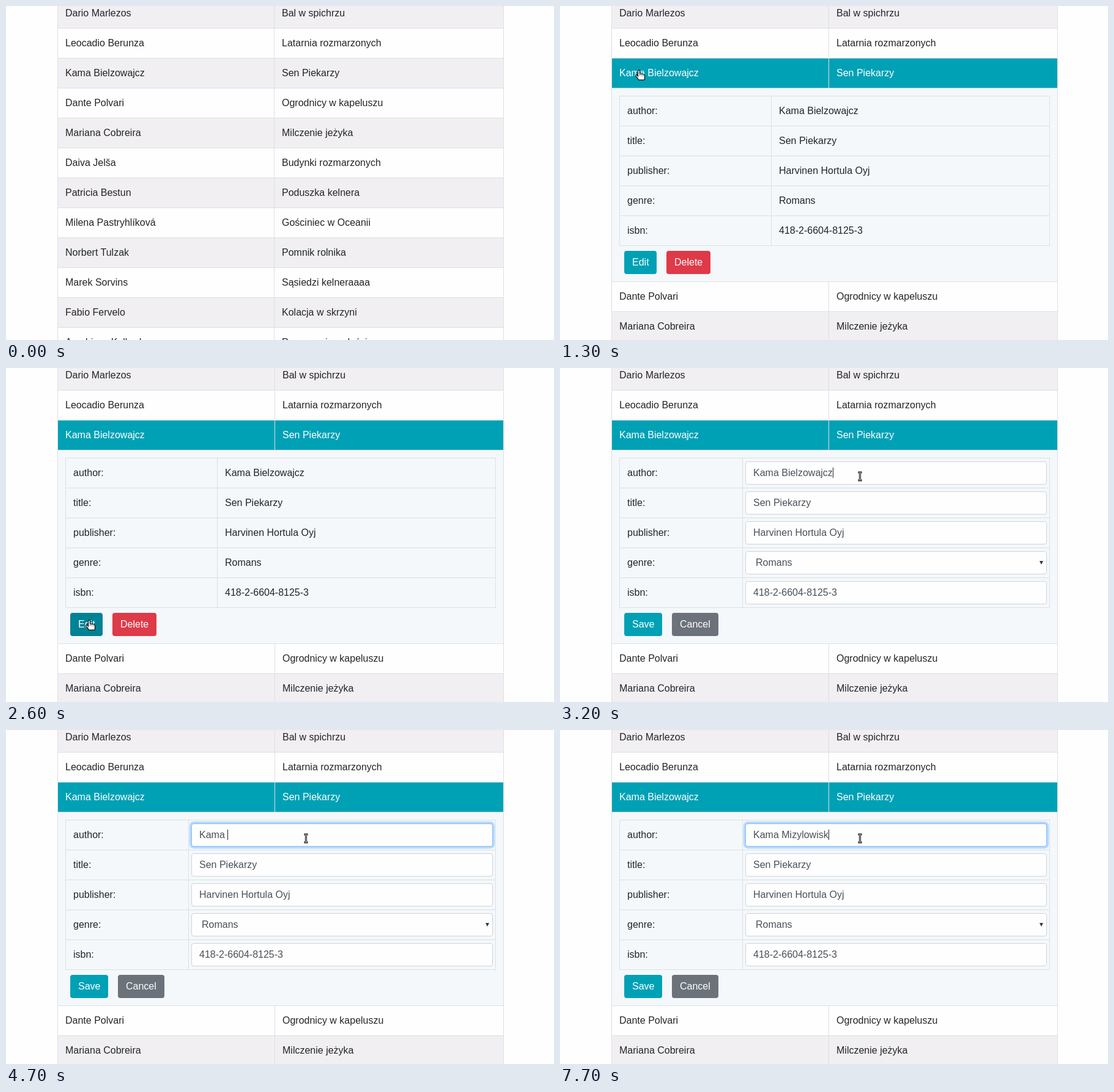
Animation, 896 px wide and 547 px high, one loop 8 s. Source, as an HTML page:

```html
<!DOCTYPE html>
<html lang="pl">
<head>
<meta charset="utf-8">
<title>Book table</title>
<style>
  html, body { margin: 0; width: 100%; height: 100%; overflow: hidden; background: #fefefe; }
  #stage { position: absolute; left: 0; top: 0; width: 896px; height: 547px; overflow: hidden;
    font: 16px/24px "Liberation Sans", Arial, sans-serif; color: #212529; }
  #stage div { position: absolute; box-sizing: border-box; white-space: pre; }
  .scene { inset: 0; }
  .row, .detail { border: 1px solid #dcdfe4; }
  .row > div { top: 0; height: 48px; padding: 12px; }
  .row > div + div { border-left: 1px solid #dcdfe4; }
  .plain { background: #fefefe; }
  .striped { background: #f1eff2; }
  .hover { background: #ebe9ea; }
  .selected { background: #00a1b5; color: #fff; }
  .detail { background: #f4f8fa; }
  .button { padding: 7px 13px; border-radius: 4px; color: #fff; }
  .info { background: #00a1b5; }
  .info.hover { background: #008295; }
  .danger { background: #de3a48; }
  .secondary { background: #6b727a; }
  .input { padding: 6px 12px; border: 1px solid #ced4da; border-radius: 4px; background: #fefefe; color: #495057; }
  .select { padding-left: 16px; }
  .select::after { content: ""; position: absolute; right: 5px; top: 15px;
    border: solid transparent; border-width: 6px 3px 0; border-top-color: #343a40; }
  #caret { display: inline-block; width: 1px; height: 17px; margin-right: -1px; vertical-align: -3px; background: #212529; }
  svg { position: absolute; left: 0; top: 0; width: 896px; height: 547px; }
</style>
</head>
<body>
<div id="stage"></div>
<script>
const LOOP = 8000, ROW = 49, OPEN_ROW = 2, DETAIL_HEIGHT = 317;

const books = [
  ["Dario Marlezos", "Bal w spichrzu"],
  ["Leocadio Berunza", "Latarnia rozmarzonych"],
  ["Kama Bielzowajcz", "Sen Piekarzy"],
  ["Dante Polvari", "Ogrodnicy w kapeluszu"],
  ["Mariana Cobreira", "Milczenie jeżyka"],
  ["Daiva Jelša", "Budynki rozmarzonych"],
  ["Patricia Bestun", "Poduszka kelnera"],
  ["Milena Pastryhlíková", "Gościniec w Oceanii"],
  ["Norbert Tulzak", "Pomnik rolnika"],
  ["Marek Sorvins", "Sąsiedzi kelneraaaa"],
  ["Fabio Fervelo", "Kolacja w skrzyni"],
  ["Arsebiusz Kolbud", "Powracanie radości"],
];
const [author, title] = books[OPEN_ROW];
const fields = [
  ["author:", author],
  ["title:", title],
  ["publisher:", "Harvinen Hortula Oyj"],
  ["genre:", "Romans"],
  ["isbn:", "418-2-6604-8125-3"],
];

// Scene markup
const box = (x, y, w, h, cls, content = "", id = "") =>
  `<div id="${id}" class="${cls}" style="left:${x}px;top:${y}px;width:${w}px;height:${h}px">${content}</div>`;

const row = (x, y, w, split, cls, left, right, id) =>
  box(x, y, w, ROW + 1, "row " + cls,
    `<div>${left}</div><div style="left:${split - x - 1}px">${right}</div>`, id);

const button = (x, w, cls, label, id) => box(x, 401, w, 38, "button " + cls, label, id);

function bookRows(open) {
  return books.map(([name, book], i) => {
    const y = -13 + ROW * i + (open && i > OPEN_ROW ? DETAIL_HEIGHT : 0);
    const chosen = i === OPEN_ROW;
    const cls = open && chosen ? "selected" : i % 2 ? "plain" : "striped";
    return row(84, y, 730, open ? 439 : 438, cls, name, book, !open && chosen ? "target" : "");
  }).join("");
}

function detail(split, editing) {
  const rows = fields.map(([label, value], i) => {
    const y = 147 + ROW * i;
    if (!editing) return row(97, y, 704, split, "", label, value);
    const cls = "input" + (label === "genre:" ? " select" : "");
    return row(97, y, 704, split, "", label, "") +
      box(303, y + 6, 493, 38, cls, i ? value : '<span id="typed"></span><i id="caret"></i>', i ? "" : "field");
  }).join("");
  const buttons = editing
    ? button(105, 62, "info", "Save", "save") + button(183, 76, "secondary", "Cancel")
    : button(105, 53, "info", "Edit", "edit") + button(174, 72, "danger", "Delete");
  return box(84, 134, 730, DETAIL_HEIGHT + 1, "detail") + rows + buttons;
}

const scenes = [
  bookRows(false),
  bookRows(true) + detail(345, false),
  bookRows(true) + detail(298, true),
];

const beamPath = "M3 3Q4.5 3 4.5 4.5V14.5Q4.5 16 3 16M6 3Q4.5 3 4.5 4.5M4.5 14.5Q4.5 16 6 16";
const beamStroke = (color, width) =>
  `<path d="${beamPath}" fill="none" stroke="${color}" stroke-width="${width}" stroke-linecap="square"/>`;

const cursors = {
  arrow: `<path d="M.7 .8V15.5L4.1 12.4 6.6 18 9 17 6.6 11.5H11.3Z" fill="#fff" stroke="#000"/>`,
  hand: `<path d="M4.5 11V2.3Q4.5.8 6 .8T7.5 2.3V7L13.5 8Q15.5 8.4 15.5 10.5V15.5Q15.5 17.2 13.8 17.2H7Q5.6 17.2 5 16L1 10.6Q.4 9.2 1.6 8.7 2.8 8.4 4.5 11Z" fill="#fff" stroke="#000" stroke-width="1.2"/>
    <path d="M7.5 8v2.5M10.2 9v2M12.8 9.5v2" stroke="#000" stroke-width=".8" stroke-opacity=".7"/>`,
  beam: beamStroke("#000", 3) + beamStroke("#fff", 1),
};

const $ = id => document.getElementById(id);
$("stage").innerHTML = scenes.map((s, i) => `<div class="scene" id="scene${i}">${s}</div>`).join("") +
  `<svg>${Object.keys(cursors).map(k => `<g id="${k}">${cursors[k]}</g>`).join("")}</svg>`;

// Timelines: [start time, ...state]
const sceneTimes = [[0, 0], [1300, 1], [2700, 2]];

const pointer = [
  [0, "none", 0, 0],
  [700, "arrow", 25, 128], [800, "arrow", 58, 123], [900, "hand", 91, 115],
  [1000, "hand", 115, 107], [1100, "hand", 123, 104], [1600, "hand", 147, 119],
  [1800, "arrow", 270, 150], [1900, "arrow", 400, 195], [2000, "arrow", 436, 260],
  [2100, "arrow", 390, 325], [2200, "arrow", 290, 376], [2400, "arrow", 185, 405],
  [2500, "hand", 140, 413], [2600, "hand", 130, 412],
  [2800, "arrow", 250, 340], [2900, "beam", 455, 200], [3100, "beam", 486, 168],
];

const firstName = author.split(" ")[0] + " ";
const erased = [[0, 11], [3600, 10], [4100, 9], [4200, 7], [4300, 5], [4400, 3], [4600, 1], [4700, 0]]
  .map(([t, n]) => [t, author.slice(0, firstName.length + n)]);
const typed = [
  [5300, "M"], [5500, "Mi"], [5600, "Miz"], [6100, "Mizy"], [6300, "Mizyl"], [6600, "Mizylw"],
  [7100, "Mizyl"], [7200, "Mizylo"], [7400, "Mizylowi"], [7700, "Mizylowisk"],
].map(([t, s]) => [t, firstName + s]);
const fieldText = [...erased, ...typed];
const caret = [[0, 0], [3200, 1], [3800, 0], [4100, 1]];
const focus = [[0, 0], [3300, 0.5], [3400, 1]];

const at = (line, t) => line.findLast(([start]) => start <= t).slice(1);
const between = (t, a, b) => t >= a && t < b;

function render(t) {
  const [scene] = at(sceneTimes, t);
  scenes.forEach((_, i) => $("scene" + i).style.display = i === scene ? "" : "none");

  $("target").classList.toggle("hover", between(t, 900, 1300));
  $("edit").classList.toggle("hover", between(t, 2500, 2700));
  $("save").classList.toggle("hover", between(t, 2700, 2800));

  const [kind, x, y] = at(pointer, t);
  for (const name in cursors) {
    $(name).style.display = name === kind ? "" : "none";
    $(name).setAttribute("transform", `translate(${x} ${y})`);
  }

  $("typed").textContent = at(fieldText, t)[0];
  $("caret").style.opacity = at(caret, t)[0];
  const [ring] = at(focus, t);
  $("field").style.boxShadow = `0 0 0 ${3.2 * ring}px rgba(0,123,255,${0.25 * ring})`;
  $("field").style.borderColor = `color-mix(in srgb, #80bdff ${100 * ring}%, #ced4da)`;
}

function tick() {
  render(performance.now() % LOOP);
  requestAnimationFrame(tick);
}
tick();
</script>
</body>
</html>
```
